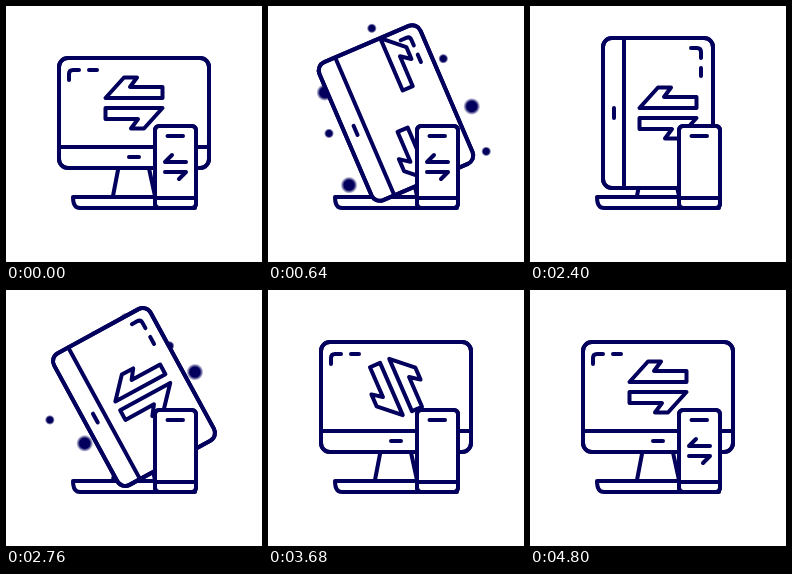
Write an HTML page that moves like this. It is 256x256 px and loops after 4.84 s.

```html
<!DOCTYPE html>
<html lang="en">
<head>
<meta charset="utf-8">
<title>Device sync</title>
<style>
  html, body { margin: 0; width: 100%; height: 100%; overflow: hidden; background: #fff; }
  svg { display: block; width: 100%; height: 100%; }
  .ink { fill: none; stroke: #02005c; stroke-width: 4; stroke-linecap: round; stroke-linejoin: round; }
  .paper { fill: #fff; }
</style>
</head>
<body>
<svg viewBox="0 0 256 256">
  <defs>
    <clipPath id="screen"><rect x="53" y="52" width="150" height="89"/></clipPath>
    <clipPath id="glass"><rect x="150" y="121" width="39" height="70"/></clipPath>
    <radialGradient id="soft">
      <stop offset=".6" stop-color="#02005c"/>
      <stop offset="1" stop-color="#02005c" stop-opacity="0"/>
    </radialGradient>
  </defs>

  <g id="dots"></g>

  <g class="ink">
    <path d="M67 191H189V202H74Q67 202 67 191Z" class="paper"/>
    <path d="M114.3 152L107 190M140.7 152L149 190"/>
  </g>

  <g id="monitor" class="ink">
    <rect x="53" y="52" width="150" height="110" rx="9" class="paper"/>
    <g clip-path="url(#screen)">
      <g id="arrows">
        <path id="arrowA" d="M-28.5 -5L-10 -25.5H3L-4 -16H28.5V-5Z"/>
        <path id="arrowB" d="M28.5 5L10 25.5H-3L4 16H-28.5V5Z"/>
      </g>
    </g>
    <rect x="53" y="52" width="150" height="110" rx="9"/>
    <path d="M53 141H203M123 151H133M63 74V68Q63 64 67 64H73M83 64H91"/>
  </g>

  <g class="ink">
    <rect x="149" y="120" width="41" height="82" rx="4" class="paper"/>
    <g clip-path="url(#glass)">
      <path id="swapA" d="M180 156H159L166 149"/>
      <path id="swapB" d="M159 166H180L173 173"/>
    </g>
    <rect x="149" y="120" width="41" height="82" rx="4"/>
    <path d="M149 192H190M161.500 130H177"/>
  </g>
</svg>
<script>
const LOOP = 4840, MOVE = 960;
const CX = 128, CY = 107;
const el = id => document.getElementById(id);
const set = (id, transform) => el(id).setAttribute('transform', transform);
const shift = (id, x) => set(id, `translate(${x.toFixed(2)} 0)`);
const rad = deg => deg * Math.PI / 180;

// Eased progress of a move that begins at the given time
function ease(t, start) {
  const u = Math.min(1, Math.max(0, (t - start) / MOVE));
  return u * u * (3 - 2 * u);
}

// angle, distance, radius
const dots = [
  [254, 88, 5], [311, 72, 5], [355, 76, 8.5], [23, 98, 5],
  [123, 86, 8.5], [163, 70, 5], [196, 74, 8.5], [96, 82, 5]
].map(([angle, dist, r]) => {
  const node = document.createElementNS('http://www.w3.org/2000/svg', 'circle');
  node.setAttribute('fill', 'url(#soft)');
  el('dots').append(node);
  return { angle, dist, r, node };
});

function drawDots(t) {
  const back = t >= 2400;
  const u = (t - (back ? 2400 : 0)) / 1140;
  const on = u > 0 && u < 1;
  const size = on ? Math.min(1, 1.35 * Math.sin(Math.PI * u)) : 0;
  const reach = 1 + 0.45 * (u - 0.561);
  const spin = (back ? 132 : 0) + (back ? -40 : 40) * (u - 0.561);
  for (const d of dots) {
    const a = rad(d.angle + spin);
    d.node.setAttribute('cx', CX + d.dist * reach * Math.cos(a));
    d.node.setAttribute('cy', CY + d.dist * reach * Math.sin(a));
    d.node.setAttribute('r', d.r * size);
  }
}

function drawArrows(t) {
  const turned = t >= 1200;
  const angle = turned ? -90 - 90 * ease(t, 3360) : 0;
  set('arrows', `translate(128 97) rotate(${angle})`);
  const out = 106 * ease(t, 200), left = 1 - ease(t, 1200);
  shift('arrowA', turned ? 73.5 * left : -out);
  shift('arrowB', turned ? -78 * left : out);
}

function drawSwap(t) {
  const x = t < 3000 ? -36 * ease(t, 1200) : 36 * (1 - ease(t, 3840));
  shift('swapA', x);
  shift('swapB', -x);
}

function draw(t) {
  const turn = 90 * (ease(t, 0) - ease(t, 2400));
  set('monitor', `rotate(${turn} ${CX} ${CY})`);
  drawDots(t);
  drawArrows(t);
  drawSwap(t);
}

const begin = performance.now();
function tick(now) {
  draw(Math.max(0, now - begin) % LOOP);
  requestAnimationFrame(tick);
}
draw(0);
requestAnimationFrame(tick);
</script>
</body>
</html>
```
